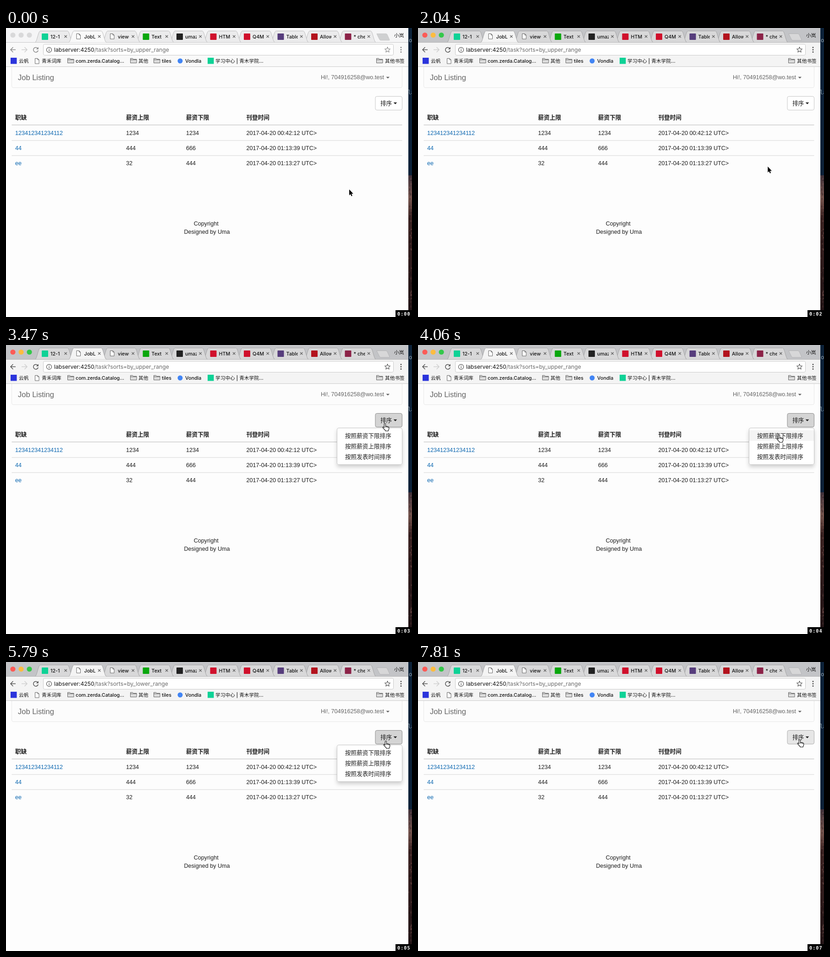
An HTML page for the animation above (8000 ms loop, 886 by 632 pixels).

```html
<!DOCTYPE html>
<html lang="zh-CN">
<head>
<meta charset="utf-8">
<title>Job Listing</title>
<style>
html, body { margin: 0; width: 100%; height: 100%; overflow: hidden; background: #fdfdfd; }
svg { display: block; }
#stage {
  --strip: #c3c4c7; --tab: #d8d8d9; --edge: #a3a3a4; --plus: #d7d7d8; --icon: #555; --bar: #f4f4f4;
  --red: #fc5b57; --amber: #fdbc40; --green: #34c84a;
}
#stage.idle {
  --strip: #f5f5f6; --tab: #ebebec; --edge: #bcbcbd; --plus: #cfd0d1; --icon: #8a8a8a; --bar: #f9f9f9;
  --red: #d9d9da; --amber: #d9d9da; --green: #d9d9da;
}
.ui { font: 500 10.7px Inter, "Noto Sans CJK SC", sans-serif; fill: #111; }
.url { font-size: 12.2px; font-weight: 400; }
.page { font: 12.6px "Liberation Sans", "Noto Sans CJK SC", sans-serif; fill: #1c1c1c; }
.head { font-weight: bold; }
.link { fill: #0a66b0; }
.soft { fill: #646464; }
.line { fill: none; stroke: var(--icon); stroke-width: 1.5; }
.clock { font: bold 10.2px "DejaVu Sans Mono", monospace; fill: #fff; letter-spacing: 1px; }
.side { font: 12px "DejaVu Sans Mono", monospace; fill: #93a1ad; }
</style>
</head>
<body>
<svg id="stage" width="886" height="632" viewBox="0 0 886 632">
  <defs>
    <linearGradient id="rock" x1="0" y1="0" x2="0" y2="1">
      <stop offset="0" stop-color="#3d2f38"/>
      <stop offset=".16" stop-color="#75544d"/>
      <stop offset=".3" stop-color="#3c2322"/>
      <stop offset="1" stop-color="#1f1214"/>
    </linearGradient>
    <filter id="shade" x="-20%" y="-20%" width="140%" height="150%">
      <feDropShadow dx="0" dy="5" stdDeviation="4.5" flood-opacity=".18"/>
    </filter>
  </defs>
  <rect width="886" height="632" fill="#fdfdfd"/>
  <g id="desk"></g>
  <g id="chrome" class="ui"></g>
  <g id="page" class="page"></g>
  <g class="page">
    <rect id="button" x="806" y="149.5" width="58.5" height="30" rx="3.6"/>
    <text x="817" y="168.7">排序</text>
    <path d="M845.7 162.8h7.6l-3.8 3.9z"/>
    <g id="menu">
      <rect x="722.5" y="181.5" width="142" height="80" rx="3.6" fill="#fff" stroke="#c6c6c6" filter="url(#shade)"/>
      <rect id="glow" x="723" width="141" height="23" fill="#f4f4f4"/>
      <text x="740" y="202.7">按照薪资下限排序</text>
      <text x="740" y="225.9">按照薪资上限排序</text>
      <text x="740" y="249.1">按照发表时间排序</text>
    </g>
  </g>
  <rect x="850" y="617" width="36" height="15"/>
  <text id="clock" class="clock" x="854" y="628.5"></text>
  <g id="cursor">
    <path id="arrow" d="M0 0V13L2.8 10.3 4.7 14.8 6.8 13.9 4.9 9.6H8.8Z" stroke="#fff" stroke-width="1.5" paint-order="stroke"/>
    <g id="hand" fill="#fff" stroke="#111" stroke-width="1.1" stroke-linejoin="round">
      <path d="M-1.6 9V1.2a1.5 1.5 0 0 1 3 0V6q1.3-1 2.7.4 1.4-.8 2.5.6 2-.4 2.1 1.4V11.5q-.3 2-1.4 3V16H1V15Q-3 11-4.8 8.6C-5.4 7.2-4 6.6-3 7.4Z"/>
      <path d="M1.4 6v2.6M4.1 6.4v2.2M6.6 7v2" fill="none"/>
    </g>
  </g>
</svg>
<script>
const LOOP = 8000;
const el = id => document.getElementById(id);
const text = (x, y, s, cls = '', more = '') => `<text x="${x}" y="${y}" class="${cls}" ${more}>${s}</text>`;
const rect = (x, y, w, h, fill, more = '') => `<rect x="${x}" y="${y}" width="${w}" height="${h}" fill="${fill}" ${more}/>`;
const disc = (x, y, r, fill) => `<circle cx="${x}" cy="${y}" r="${r}" fill="${fill}"/>`;
const line = (d, more = '') => `<path class="line" d="${d}" ${more}/>`;
const sheet = (x, y) => `<path d="M${x + .5} ${y + .5}h5.5l3 3v8.5h-8.5zM${x + 6} ${y + .5}v3h3" fill="#fff" stroke="#666"/>`;
const folder = x => `<path d="M${x + .5} 76.5v-10h5l1.5 1.8h7v8.2zM${x + .5} 69.5h13.5" fill="#dcdcdc" stroke="#666"/>`;

function drawDesk() {
  let seed = 7, out = rect(878, 0, 8, 322, '#0b2138') + rect(878, 322, 8, 310, 'url(#rock)');
  const rnd = () => (seed = seed * 16807 % 2147483647) / 2147483647;
  for (let i = 0; i < 90; i++) {
    out += rect(878 + rnd() * 6, 324 + rnd() * 290, 1 + rnd() * 2, 1 + rnd() * 4, i % 2 ? '#150d10' : '#8a655c', 'opacity=".3"');
  }
  return out + text(879, 31, 'op', 'side') + text(877, 145, 'la', 'side');
}

// title and icon colour; no colour means a blank sheet
const tabs = [
  ['12-1', '#0fd296'], ['JobLis', ''], ['view-s', ''], ['Text', '#0aa70d'], ['umaz', '#222'],
  ['HTML', '#d0102c'], ['Q4M', '#d0102c'], ['Table', '#563d7c'], ['Allow', '#b3121d'], ['* che', '#8c2348']
];

function drawTab(i) {
  const [title, color] = tabs[i], x = 78 + 73.5 * i, active = i === 1;
  const shape = `M${x - 15} 31.5C${x - 10} 31 ${x - 8} 6.5 ${x - 3} 6.5H${x + 56}C${x + 61} 6.5 ${x + 63} 31 ${x + 68} 31.5`;
  return `<path d="${shape}" style="fill:var(${active ? '--bar' : '--tab'});stroke:var(--edge)"/>`
    + (color ? rect(x, 12, 14, 14, color, 'rx="1"') : sheet(x + 2, 12))
    + `<svg x="${x + 19}" y="8" width="25" height="22">${text(0, 14.5, title)}</svg>`
    + `<path d="M${x + 49.5} 15.8l5.4 5.4m0-5.4l-5.4 5.4" stroke="#555" stroke-width="1.2"/>`;
}

function drawChrome() {
  let out = rect(0, 0, 878, 32, 'var(--strip)');
  out += disc(15, 15.5, 5.6, 'var(--red)') + disc(33, 15.5, 5.6, 'var(--amber)') + disc(51, 15.5, 5.6, 'var(--green)');
  for (let i = tabs.length - 1; i >= 0; i--) if (i !== 1) out += drawTab(i);
  out += '<path d="M809 12.5h20q2 0 3 2l5 11q.6 1.5-1 1.5h-18q-2 0-3-2l-5-10q-1-2.5-1-2.5z" style="fill:var(--plus);stroke:var(--edge);stroke-width:.6"/>';
  out += text(847, 19.5, '小岚');
  out += rect(0, 31, 878, 53.5, 'var(--bar)') + rect(0, 31, 878, .8, 'var(--edge)') + drawTab(1);
  out += rect(0, 84, 878, 1, '#cbcbcb');
  out += rect(81.5, 35.5, 764, 24, '#fff', 'rx="3" stroke="#c9c9c9"');
  out += line('M21 47.5H10.5M15.5 42L10 47.5l5.5 5.5') + line('M34 47.5h11M40.5 42l5.5 5.5-5.5 5.5', 'style="stroke:#cfcfcf"');
  out += line('M69.3 44.5a5.3 5.3 0 1 0 .9 4.5') + '<path d="M70.8 41.5v5h-5z" style="fill:var(--icon)"/>';
  out += '<circle cx="94" cy="47.8" r="5.5" fill="none" stroke="#555" stroke-width="1.2"/>'
    + rect(93.4, 47, 1.3, 3.8, '#555') + rect(93.4, 44.6, 1.3, 1.4, '#555');
  out += '<text x="105" y="52" class="url">labserver:4250<tspan id="path" fill="#6c6c6c"></tspan></text>';
  out += line('M832.5 41.8l1.7 3.7 4 .5-3 2.7.8 4-3.5-2-3.5 2 .8-4-3-2.7 4-.5z', 'style="stroke-width:1.1"');
  for (const y of [42.5, 47.5, 52.5]) out += disc(862, y, 1.5, 'var(--icon)');

  out += rect(10, 65, 13.5, 13.5, '#2b34dc') + text(28, 76, '云帆');
  out += sheet(63, 66) + text(78, 76, '青禾词库');
  out += folder(134) + text(152, 76, 'com.zerda.Catalog...');
  out += folder(271) + text(289, 76, '其他');
  out += folder(322) + text(340, 76, 'tiles');
  out += disc(380, 72, 5.5, '#4285f4') + text(391, 76, 'Vondla');
  out += rect(440, 65, 13.5, 13.5, '#0fd296') + text(457, 76, '学习中心 | 青木学院...');
  return out + folder(808) + text(827, 76, '其他书签');
}

function drawPage() {
  const cols = [20, 262, 393, 524.5];
  const row = (y, cells, cls) => cells.map((s, i) => text(cols[i], y, s, cls || (i ? '' : 'link'))).join('');
  return '<path d="M12.5 85V127q0 3.5 3.5 3.5H861q3.5 0 3.5-3.5V85" fill="#fcfcfc" stroke="#e8e8e8"/>'
    + text(26, 113.6, 'Job Listing', 'soft', 'style="font-size:16.5px"')
    + text(687, 112.4, 'Hi!, 704916258@wo.test', 'soft')
    + '<path class="soft" d="M829.5 106.7h7.6l-3.8 3.9z"/>'
    + row(200, ['职缺', '薪资上限', '薪资下限', '刊登时间'], 'head')
    + rect(12.5, 211.2, 852, 1.7, '#d3d3d3')
    + row(234, ['123412341234112', '1234', '1234', '2017-04-20 00:42:12 UTC&gt;'])
    + rect(12.5, 245.5, 852, 1, '#d3d3d3')
    + row(267, ['44', '444', '666', '2017-04-20 01:13:39 UTC&gt;'])
    + rect(12.5, 278.5, 852, 1, '#d3d3d3')
    + row(300, ['ee', '32', '444', '2017-04-20 01:13:27 UTC&gt;'])
    + text(436.7, 432, 'Copyright', '', 'text-anchor="middle"')
    + text(438.5, 450, 'Designed by Uma', '', 'text-anchor="middle"');
}

// begin, end, steps, x, y
const moves = [
  [1790, 2780, 8, 806, 153], [2920, 3170, 3, 827, 172], [3615, 3760, 2, 788, 197],
  [5100, 5350, 3, 829, 173], [5940, 6230, 3, 798, 221],
  [7120, 7121, 1, 800, 224], [7220, 7810, 5, 833, 170]
];
const ticks = [900, 1930, 2920, 4060, 5100, 6085, 7220];
const within = (v, a, b) => v >= a && v < b;

function cursorAt(t) {
  let x = 749, y = 353;
  for (const [begin, end, steps, tx, ty] of moves) {
    if (t < begin) break;
    const done = Math.floor((t - begin) / (end - begin) * (steps - 1) + 1e-6) + 1;
    const k = Math.min(1, done / steps);
    x += (tx - x) * k;
    y += (ty - y) * k;
  }
  return [x, y];
}

function show(t) {
  const [x, y] = cursorAt(t);
  const open = within(t, 3470, 4205) || within(t, 5650, 6385);
  const onButton = within(x, 808, 865) && within(y, 149, 180);
  const item = open && within(x, 723, 865) ? Math.floor((y - 186.5) / 23.2) : -1;
  const onItem = within(item, 0, 3);
  const [fill, stroke] = open ? ['#d4d4d4', '#8c8c8c'] : onButton ? ['#e6e6e6', '#adadad'] : ['#fff', '#c6c6c6'];

  el('stage').setAttribute('class', t < 900 ? 'idle' : '');
  el('button').setAttribute('fill', fill);
  el('button').setAttribute('stroke', stroke);
  el('menu').style.display = open ? '' : 'none';
  el('glow').style.display = onItem ? '' : 'none';
  el('glow').setAttribute('y', 186.5 + 23.2 * Math.max(0, item));
  el('path').textContent = `/task?sorts=by_${within(t, 4205, 6530) ? 'lower' : 'upper'}_range`;
  el('clock').textContent = '0:0' + ticks.filter(s => t >= s).length;
  el('cursor').setAttribute('transform', `translate(${x} ${y})`);
  el('hand').style.display = onButton || onItem ? '' : 'none';
  el('arrow').style.display = onButton || onItem ? 'none' : '';
}

el('desk').innerHTML = drawDesk();
el('chrome').innerHTML = drawChrome();
el('page').innerHTML = drawPage();

const start = performance.now();
function frame() {
  show((performance.now() - start) % LOOP);
  requestAnimationFrame(frame);
}
frame();
</script>
</body>
</html>
```
